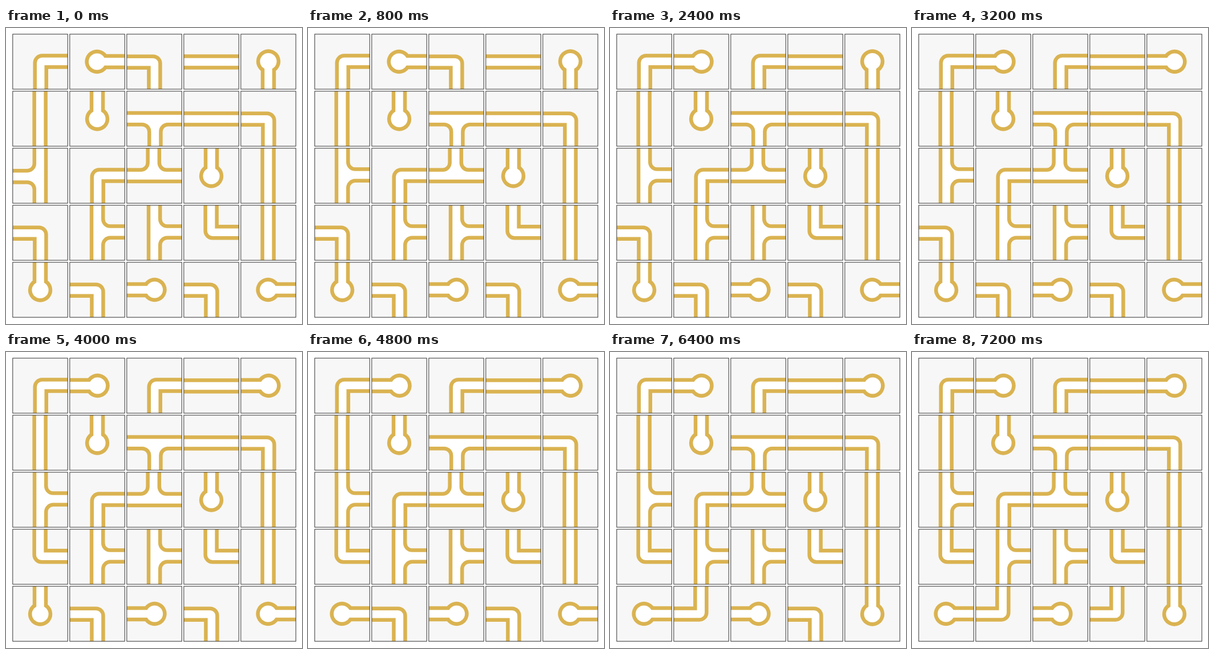
An HTML page with a canvas that plays this animation: 519x519 px, repeating every 8 s.

```html
<!DOCTYPE html>
<html>
<head>
<meta charset="utf-8">
<title>Pipe puzzle</title>
<style>
  html, body { margin: 0; width: 100%; height: 100%; overflow: hidden; background: #fff; }
  canvas { display: block; }
</style>
</head>
<body>
<canvas id="stage" width="519" height="519"></canvas>
<script>
const ctx = document.getElementById('stage').getContext('2d');
const GOLD = '#dab351', STEP = 800, LOOP = 8000;
const FAR = 60, BEND = 12.5;

// Piece letter and number of clockwise quarter turns, row by row
const START = [
  'C0 E0 C1 I3 E1',
  'I0 E3 T1 I3 C1',
  'T2 C0 T3 E3 I0',
  'C1 T0 T0 C3 I0',
  'E3 C1 E2 C1 E0'
].join(' ').split(' ');

// One tile is turned at every step: [tile, new turns]
const MOVES = [[10, 0], [1, 2], [2, 0], [4, 2], [15, 3], [20, 0], [21, 2], [24, 3], [23, 2]];

// White shape with a gold wall; its far sides fall outside the tile
function pipe(trace) {
  ctx.beginPath();
  trace();
  ctx.closePath();
  ctx.fillStyle = '#fff';
  ctx.fill();
  ctx.strokeStyle = GOLD;
  ctx.lineWidth = 6.5;
  ctx.stroke();
}

function disc(x, y, radius, color) {
  ctx.fillStyle = color;
  ctx.beginPath();
  ctx.arc(x, y, radius, 0, 2 * Math.PI);
  ctx.fill();
}

const pieces = {
  I() {
    pipe(() => ctx.rect(-10.4, -FAR, 20, 2 * FAR));
  },
  C() {
    const left = -9.3, right = 10.7, top = -10.4, bottom = 9.6;
    pipe(() => {
      ctx.moveTo(left, FAR);
      ctx.arcTo(left, top, FAR, top, BEND);
      ctx.lineTo(FAR, top);
      ctx.lineTo(FAR, bottom);
      ctx.lineTo(right, bottom);
      ctx.lineTo(right, FAR);
    });
  },
  E() {
    disc(-0.5, 0, 21.2, GOLD);
    pipe(() => ctx.rect(0, -10, FAR, 20));
    disc(-0.5, 0, 14.6, '#fff');
  },
  T() {
    const left = -10, right = 10.2, top = -11.4, bottom = 8.8;
    pipe(() => {
      ctx.moveTo(left, -FAR);
      ctx.lineTo(left, FAR);
      ctx.lineTo(right, FAR);
      ctx.arcTo(right, bottom, FAR, bottom, BEND);
      ctx.lineTo(FAR, bottom);
      ctx.lineTo(FAR, top);
      ctx.arcTo(right, top, right, -FAR, BEND);
      ctx.lineTo(right, -FAR);
    });
  }
};

function drawTile([piece, turns], index) {
  ctx.save();
  ctx.translate(60 + index % 5 * 100, 59 + Math.floor(index / 5) * 100);
  ctx.beginPath();
  ctx.rect(-48, -48, 96, 96);
  ctx.fillStyle = '#f7f7f7';
  ctx.fill();
  ctx.save();
  ctx.clip();
  ctx.rotate(turns * Math.PI / 2);
  pieces[piece]();
  ctx.restore();
  ctx.strokeStyle = '#333';
  ctx.lineWidth = 1;
  ctx.strokeRect(-48.2, -48.2, 96.4, 96.4);
  ctx.restore();
}

function draw(now) {
  const tiles = [...START];
  const done = Math.floor(now % LOOP / STEP);
  for (const [tile, turns] of MOVES.slice(0, done)) tiles[tile] = tiles[tile][0] + turns;
  ctx.fillStyle = '#fff';
  ctx.fillRect(0, 0, 519, 519);
  tiles.forEach(drawTile);
}

const start = performance.now();
function frame() {
  draw(performance.now() - start);
  requestAnimationFrame(frame);
}
frame();
</script>
</body>
</html>
```
